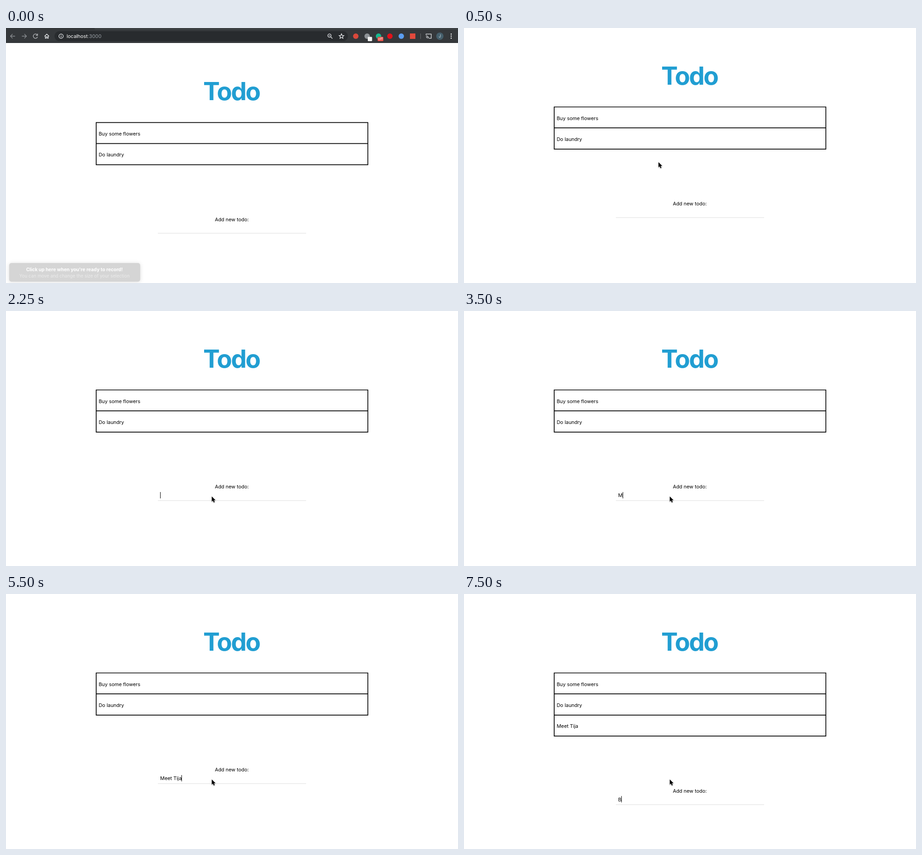
These frames come from a looping animation (997x562 px, 8 s). An HTML page:

```html
<!DOCTYPE html>
<html lang="en">
<head>
<meta charset="utf-8">
<title>Todo</title>
<style>
  html, body { margin: 0; width: 100%; height: 100%; overflow: hidden; background: #fff; }
  svg { display: block; width: 997px; height: 562px; }
  text { font: 10.87px Inter, "Open Sans", sans-serif; font-optical-sizing: none; white-space: pre; }
  .mid { text-anchor: middle; }
  .title { font-size: 55px; font-weight: 700; letter-spacing: -2.5px; fill: #219ed2; }
  .grid { fill: none; stroke: #000; stroke-width: 1.7; }
  .icon { fill: none; stroke: #e8eaed; stroke-width: 1.3; }
  .dim { stroke: #8b8e92; }
</style>
</head>
<body>
<svg viewBox="0 0 997 562">
  <g id="page">
    <text class="mid title" x="497.3" y="124.5">Todo</text>
    <path class="grid" d="M198.9 174H798.2V266.9H198.9ZM198.9 220.2H798.2"/>
    <text x="204.5" y="202.7">Buy some flowers</text>
    <text x="204.5" y="248.9">Do laundry</text>
    <g id="added">
      <path class="grid" d="M198.9 266.9V313.2H798.2V266.9"/>
      <text x="204.5" y="295.2">Meet Tija</text>
    </g>
    <g id="form">
      <text class="mid" x="498" y="391.4">Add new todo:</text>
      <path d="M335 417.9H662" stroke="#dcdcdc"/>
      <text id="typed" x="340.1" y="410.4"></text>
      <rect id="caret" y="399" width="1" height="14"/>
    </g>
  </g>

  <g id="toolbar">
    <path d="M0 0H997V33H0Z" fill="#35383b"/>
    <path d="M195 0H997V3.5H199Q195 3.5 195 0Z" fill="#3f4346"/>
    <path d="M0 32.5H997" stroke="#2a2d30"/>
    <rect x="107" y="7" width="647" height="22" rx="11" fill="#282b2e"/>
    <path class="icon dim" d="M20 18H10M14.5 13.2L9.8 18L14.5 22.8M35 18H45M40.5 13.2L45.2 18L40.5 22.8"/>
    <path class="icon" stroke-opacity=".75" d="M68.8 15A4.8 4.8 0 1 0 69.6 19.4M69.6 12.6V16.4H65.8"/>
    <path class="icon" d="M85 18.3L90 13.4L95 18.3M86.7 17V22.6H88.8V19.4H91.2V22.6H93.3V17"/>
    <circle class="icon" cx="121.5" cy="18" r="4.8"/>
    <path class="icon" d="M121.5 17.3V20.8M121.5 15V16.2"/>
    <text x="133.7" y="21.9" fill="#9aa0a6"><tspan fill="#fff">localhost</tspan>:3000</text>
    <circle class="icon" cx="713.5" cy="16.8" r="3.6"/>
    <path class="icon" d="M716.2 19.5L720 23.3M712 16.8H715"/>
    <path id="star" class="icon" stroke-width="1.1"/>
    <g id="extensions"></g>
    <rect x="798" y="19.5" width="9.5" height="9.5" rx="1.5" fill="#f4f4f4"/>
    <rect x="819.5" y="19.5" width="13" height="9.5" rx="2" fill="#e5483f"/>
    <text class="mid" x="826" y="27" fill="#fff" style="font-size:8px">off</text>
    <path d="M914.5 12V24" stroke="#6a6d70"/>
    <path class="icon" d="M926.5 15.3V13.3H938V22.7H933M926.5 17.2A5.5 5.5 0 0 1 932 22.8M926.5 19.8A3 3 0 0 1 929.4 22.8"/>
    <circle cx="957" cy="18" r="8" fill="#455f6c"/>
    <text class="mid" x="957" y="21" fill="#dfe8ec" style="font-size:8.5px">J</text>
    <path d="M982 13.4V23" fill="none" stroke="#e8eaed" stroke-width="2.6" stroke-linecap="round" stroke-dasharray="0 4.5"/>
  </g>

  <g id="toast">
    <rect x="7" y="518" width="289" height="41" rx="5" fill="#d5d5d5" style="filter:drop-shadow(0 1px 4px #0002)"/>
    <text class="mid" x="151" y="536.2" fill="#fff" style="font-size:10.3px;font-weight:700">Click up here when you're ready to record!</text>
    <text class="mid" x="151" y="549.6" fill="#ebebeb" style="font-size:9.9px">You can move and change the size of your selection</text>
  </g>

  <path id="cursor" d="M0 0V11.4L2.6 9L4.4 13.2L6.5 12.3L4.7 8.2H8.2Z" stroke="#fff" stroke-width=".9"
    paint-order="stroke" style="filter:drop-shadow(0 1px 1px #0005)"/>
</svg>
<script>
  const LOOP = 8000, HEADER = 34.4, ROW = 46.3;
  const $ = id => document.getElementById(id);
  const show = (id, on) => $(id).style.visibility = on ? "visible" : "hidden";
  const move = (id, x, y) => $(id).setAttribute("transform", `translate(${x} ${y})`);

  // Each track holds [start ms, ...values] and changes in hard steps.
  const pointer = [[500, 429, 295.7], [750, 434.7, 458.7], [1000, 450.7, 420.8], [1250, 453.9, 408.7]];
  const typing = [
    [0, ""], [3500, "M"], [4000, "Mee"], [4250, "Meet "], [4750, "Meet T"],
    [5000, "Meet Ti"], [5250, "Meet Tij"], [5500, "Meet Tija"], [5750, ""], [7500, "B"]
  ];
  const blink = [[0, 0], [2250, 1], [2750, 0], [3500, 1], [6250, 0], [6750, 1], [7250, 0], [7500, 1]];
  const at = (track, t) => track.filter(step => step[0] <= t).pop();

  const star = Array.from({ length: 10 }, (_, i) => {
    const r = i % 2 ? 2.5 : 5.6, a = i * Math.PI / 5;
    return [740 + r * Math.sin(a), 18.3 - r * Math.cos(a)].map(v => v.toFixed(2));
  });
  $("star").setAttribute("d", `M${star.join("L")}Z`);

  $("extensions").innerHTML = ["#d9483b", "#8e9296", "#17b890", "#e0121b", "#5b9df0", "#e2493c"]
    .map((color, i) => i === 5
      ? `<rect x="891" y="12" width="12" height="12" fill="${color}"/>`
      : `<circle cx="${771.5 + i * 25.1}" cy="18" r="6" fill="${color}"/>`)
    .join("");

  function draw(t) {
    const framed = t < 500, added = t >= 5750;
    show("toast", t < 250);
    show("toolbar", framed);
    show("added", added);
    move("page", 0, framed ? HEADER : 0);
    move("form", 0, added ? ROW : 0);

    const spot = at(pointer, t);
    show("cursor", spot);
    if (spot) move("cursor", spot[1], spot[2]);

    const typed = $("typed");
    typed.textContent = at(typing, t)[1];
    const width = typed.textContent ? typed.getComputedTextLength() : 0;
    $("caret").setAttribute("x", Math.round(340 + width));
    show("caret", at(blink, t)[1]);
  }

  const start = performance.now();
  function tick() {
    draw((performance.now() - start) % LOOP);
    requestAnimationFrame(tick);
  }
  tick();
</script>
</body>
</html>
```
